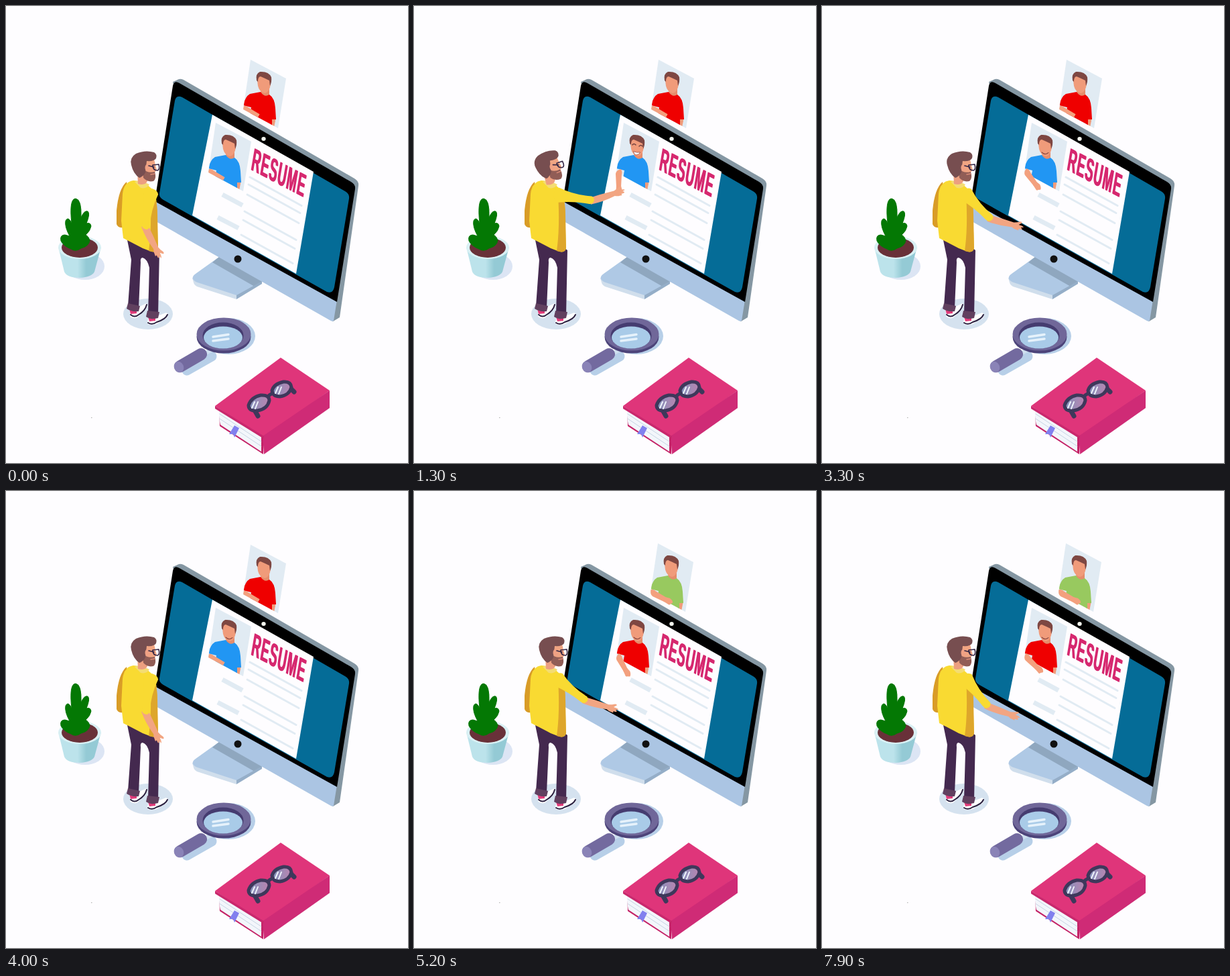
Write an HTML page that moves like this. It is 600x681 px and loops after 8000 ms.

```html
<!DOCTYPE html>
<html lang="en">
<head>
<meta charset="utf-8">
<title>Online interview</title>
<style>
html, body { margin: 0; width: 100%; height: 100%; overflow: hidden; background: #fefdff; }
svg { display: block; width: 100vw; height: 100vh; }
.line { fill: none; stroke-linecap: round; stroke-linejoin: round; }
.title { font: bold 48px "Liberation Sans", Arial, sans-serif; letter-spacing: 3px; fill: #d6286f; }
</style>
</head>
<body>
<svg viewBox="0 0 600 681" preserveAspectRatio="none">
<defs>
  <linearGradient id="lens"><stop offset="0" stop-color="#8193bd"/><stop offset="1" stop-color="#bb84b0"/></linearGradient>
  <linearGradient id="pot"><stop offset=".45" stop-color="#bce3eb"/><stop offset=".65" stop-color="#94cad5"/></linearGradient>
  <clipPath id="card"><path d="M313 174L366 202L354 276L302 248Z"/></clipPath>
</defs>

<g id="back"></g>

<g id="monitor">
  <path d="M279 408Q277 403 283 399L318 374L384 410L345 432L284 414Z" fill="#afc9e5"/>
  <path d="M318 374L384 410L371 418L308 382Z" fill="#8fa7bf"/>
  <path d="M279 406Q280 410 286 412L344 431V437L285 418Q279 415 279 406Z" fill="#d0deec"/>
  <path d="M344 431L382 410V414L344 437Z" fill="#95aec8"/>
  <path d="M249 113L258 109Q261 108 265 110L520 257Q527 261 526 268L498 464L488 470L300 340Z" fill="#8597a3"/>
  <path d="M223 287L494 438L489 469Q487 471 483 468L222 320Q217 316 218 311Z" fill="#abc5e3"/>
  <path d="M249 119Q251 110 259 115L515 262Q522 266 521 273L494 441L222 291Z" fill="#000"/>
  <path d="M252 141Q254 132 263 136L506 276Q513 280 512 287L490 419Q488 429 479 426L235 289Q228 285 229 279Z" fill="#056c97"/>
  <path d="M308 162L459 247L433 399L278 312Z" fill="#fefdff"/>
  <ellipse cx="384.500" cy="198" rx="3.200" ry="3" fill="#f3f6ed"/>
  <circle cx="346" cy="377" r="5.500" fill="#111"/>
  <path d="M313 174L366 202L354 276L302 248Z" fill="#e1ebf3"/>
  <g id="rules" class="line" stroke="#e1ebf3"></g>
  <g transform="matrix(.358 .187 -.165 .97 364.500 243.500)">
    <text id="word" class="title">RESUME</text>
    <use href="#word" x="3"/>
  </g>
</g>
<g id="seat"></g>
<g id="flyer"></g>

<g id="plant">
  <ellipse cx="118" cy="388" rx="29" ry="20" fill="#dce5f4"/>
  <path d="M78 359L87 396Q91 405 110 405Q128 404 132 396L142 359Z" fill="url(#pot)"/>
  <ellipse cx="110" cy="360" rx="32" ry="17" fill="#d9f0f4"/>
  <ellipse cx="110" cy="360" rx="27" ry="15" fill="#693139"/>
  <path d="M97 362Q86 358 82 350Q80 341 88 341L95 343Q87 328 89 320Q92 314 96 320L98 324Q94 287 104 287Q113 288 112 315Q117 304 122 306Q126 309 120 324Q126 322 127 328Q126 335 119 341Q123 343 125 349Q124 358 112 361Q104 367 97 362Z" fill="#047804" stroke="#047804"/>
</g>

<g id="man">
  <ellipse cx="212" cy="459" rx="37" ry="23" fill="#d5e2ef"/>
  <path d="M186 455L199 448L210 443Q213 448 207 454L195 465Q184 466 185 459Z" fill="#fff"/>
  <path d="M213 465L226 462L239 457Q244 459 240 465L225 474Q210 478 211 470Z" fill="#fff"/>
  <path class="line" d="M186 460Q192 465 198 460Q208 454 210 445M212 472Q218 476 225 471Q238 467 241 460" stroke="#2b2140" stroke-width="2"/>
  <path d="M184 451h11v7l-9 1ZM212 463h11v6l-9 1Z" fill="#e13a79"/>
  <path d="M180 344L187 378L182 447L198 450L201 382Q200 375 204 375Q211 377 214 390L212 459L227 462L229 364L206 345Z" fill="#44294f"/>
  <path d="M182 443L200 447L198 455Q187 456 180 451ZM211 454L229 456L227 465Q216 468 209 463Z" fill="#61405f"/>
  <path d="M180 262Q168 272 165 305V325Q167 331 174 330L184 290Z" fill="#d99c27"/>
  <path d="M190 260Q176 262 174 280L172 320L175 346Q183 350 204 361L217 366Q226 368 227 361L225 305Q226 280 216 271Q208 263 200 261Z" fill="#f9da32"/>
  <path d="M215 280Q226 283 226 310L227 361Q225 368 217 366L213 365Q218 330 215 280Z" fill="#dea62b"/>
  <path d="M192 262Q200 258 214 266Q210 273 201 271Z" fill="#f4dc72"/>
  <g id="head">
    <path d="M196 246H211V261Q208 268 197 265Z" fill="#ec9f80"/>
    <path d="M204 228H221L223 237L225 244L222 248V255Q221 260 215 260L204 253Z" fill="#f0a583"/>
    <path d="M204 242Q211 250 222 247Q225 257 220 261Q211 263 205 256Z" fill="#915d56"/>
    <path d="M216 251l6-1" class="line" stroke="#d98b77" stroke-width="1.500"/>
    <path d="M187 237Q184 226 194 220Q208 214 221 218Q226 221 224 227Q221 232 210 231L208 248Q205 254 199 256Q190 250 187 237Z" fill="#774e50"/>
    <ellipse cx="211.500" cy="241" rx="4" ry="5.500" fill="#f0a184"/>
    <path class="line" d="M213 238L221 240M219 237L228 236Q230 244 226 245Q219 245 219 237Z" stroke="#352746" stroke-width="1.600"/>
  </g>
  <g id="arm">
    <g id="fore">
      <path d="M-4 -5Q15 -5 35 -3.500L40 -5Q46 -9 47 -6L43 -2Q50 -2 51 0L47 1Q51 3 48 4L44 4Q46 7 42 6Q37 6 34 4Q15 7 -4 5Z" fill="#f2a582"/>
    </g>
    <path d="M-2 -10Q22 -3 48 -6Q54 -4 52 2Q51 6 45 6Q22 6 0 12Q-9 8 -9 0Q-8 -8 -2 -10Z" fill="#f9da32"/>
  </g>
</g>

<g id="magnifier">
  <ellipse cx="332" cy="492" rx="40" ry="27" fill="#b7cfe8"/>
  <path class="line" d="M270 543L307 522" stroke="#b7cfe8" stroke-width="15"/>
  <path class="line" d="M298 517L311 510" stroke="#cfdfef" stroke-width="6"/>
  <ellipse cx="325" cy="493" rx="40.500" ry="24.500" fill="#4c4379"/>
  <ellipse cx="325" cy="489" rx="40.500" ry="24.500" fill="#706799"/>
  <ellipse cx="324" cy="491" rx="30.500" ry="19.500" fill="#453c70"/>
  <ellipse cx="324" cy="494" rx="29" ry="16.500" fill="#a9cbe8"/>
  <path class="line" d="M309 493L332 489.500M309 499L332 496" stroke="#e6f2fb" stroke-width="3.500"/>
  <path class="line" d="M260 537L291 519" stroke="#736a9f" stroke-width="18"/>
  <ellipse cx="258" cy="538" rx="7" ry="8.500" transform="rotate(-25 258 538)" fill="#8a83b7"/>
</g>

<g id="book">
  <path d="M318 600L384 640V668L319 626Z" fill="#c42267"/>
  <path d="M318 599L381 642V664L320 624Q317 611 318 599Z" fill="#f3f6fb"/>
  <path class="line" d="M319 608L381 649M319 615L381 656" stroke="#c7d5e4" stroke-width="1"/>
  <path d="M410 524L483 573L385 643L312 596Z" fill="#df357a"/>
  <path d="M483 573V599L385 668L383 641Z" fill="#cf2b76"/>
  <path d="M312 596L385 641V645L312 600Z" fill="#c9286d"/>
  <path d="M341 625L348 629L341 643L339 638L333 638Z" fill="#8180ee"/>
  <g id="specs">
    <path class="line" d="M426 571L430 575M372 604L376 611" stroke="#3e385b" stroke-width="7"/>
    <path class="line" d="M389 586Q392 578 400 577" stroke="#3e385b" stroke-width="5"/>
    <g fill="url(#lens)" stroke="#3e385b" stroke-width="5">
      <path d="M397 573Q400 563 414 560Q425 559 426 568Q423 580 409 582Q398 582 397 573Z"/>
      <path d="M362 595Q366 583 380 580Q393 579 393 588Q390 601 375 603Q362 604 362 595Z"/>
    </g>
    <path class="line" d="M402 577L406 568M407 578L411 568M367 599L371 590M372 600L376 590" stroke="#eef3fb" stroke-width="2"/>
  </g>
</g>
<rect x="127" y="613" width="1.500" height="1" fill="#aaa"/>
</svg>

<script>
const $ = id => document.getElementById(id);
const LOOP = 8000, TICK = 100, SWAP = 4300, LAND = 4500;
const BLUE = '#2196f3', RED = '#ef0000', GREEN = '#98c95f';

const bar = (x, y, dx, dy, w) => `<path d="M${x} ${y}l${dx} ${dy}" stroke-width="${w}"/>`;
$('rules').innerHTML =
  [[364, 255], [362, 266], [360, 281], [356, 306], [354, 319], [351, 341]]
    .map(([x, y]) => bar(x, y, 77, 42.5, 3)).join('') +
  `<g stroke-linecap="butt">${bar(323, 281, 30, 16, 7)}${bar(316, 315, 31, 16, 7)}</g>`;

const faces = {
  calm: '',
  smile: '<path class="line" d="M328 218Q333 223 338 218.500" stroke="#8f4b43" stroke-width="1.100"/>',
  laugh: `<path d="M327.500 216.500Q332 219 338 218Q335 222.500 331 222Q328 220.500 327.500 216.500Z" fill="#fff" stroke="#9b5047" stroke-width=".8"/>
    <path class="line" d="M326 207Q328 204 331 207M336 209Q339 206 341 209" stroke="#70413f" stroke-width="1.500"/>`
};

// The forearm stays behind the card edge until the hand reaches out
function person(shirt, face, angle, dy, reaching) {
  const clip = reaching ? '' : 'clip-path="url(#card)"';
  const hand = '<path d="M20 -3.500L26 -5Q32 -4 33 -1L31 2Q31 5 27 4L20 3.500Z"/>';
  return `<g clip-path="url(#card)">
    <path d="M343 256L351 260L348 275L343 272Z" fill="#f09b7a"/>
    <path d="M329 212L341 216V228Q335 234 328 225Z" fill="#e58c6b"/>
    <path d="M328 222Q334 231 341 226Q349 231 350 246L351 263L345 263V273L312 257L314 245L302 242Q305 229 312 225Z" fill="${shirt}"/>
  </g>
  <path d="M322.500 201Q326 194 337 197Q344 200 343 211Q341 223 334 224Q326 222 324 213Z" fill="#f09b7a"/>
  <path d="M322 205Q320 195 327 192Q340 191 344 200Q345 207 342 213L341 205Q335 202 328 199Q324 199 324 207Z" fill="#7e4742"/>
  ${faces[face]}
  <g ${clip}><g transform="translate(305.500 ${248 + dy}) rotate(${angle})" fill="#f3a07e">
    <path d="M-5 -3Q-2 -6 3 -4.500L22 -3.500V3.500L2 4.500Q-3 4 -5 -3Z"/>
    ${reaching ? hand : ''}
  </g></g>`;
}

const card = shirt =>
  `<path d="M313 174L366 202L354 276L302 248Z" fill="#e1ebf3"/>` +
  person(shirt, 'calm', 28, 0, shirt === GREEN);

// Eased value between [time, value] steps
function track(t, steps) {
  let [t0, v0] = steps[0];
  for (const [t1, v1] of steps) {
    if (t < t1) {
      const u = t <= t0 ? 0 : (t - t0) / (t1 - t0);
      return v0 + (v1 - v0) * u * u * (3 - 2 * u);
    }
    [t0, v0] = [t1, v1];
  }
  return v0;
}

const UPPER = [[120, 0], [1050, 1], [2800, 1], [3950, 0], [4620, 0], [5550, 1], [7300, 1], [8550, 0]];
const FORE = [[200, 0], [1100, 1], [2800, 1], [3950, 0], [4700, 0], [5600, 1], [7300, 1], [8550, 0]];
const GUEST = [[200, 0], [1150, 1], [2750, 1], [3730, 0], [4700, 0], [5650, 1], [7250, 1], [8230, 0]];
const NOD = [[500, 0], [1200, -13], [1500, -13], [2400, -6], [3400, 0]];

function shake(t) {
  const u = (t >= 4500 ? t - 4500 : t) - 1400;
  return u > 0 && u < 900 ? Math.sin(u / 450 * 2 * Math.PI) : 0;
}

const move = (el, x, y) => el.setAttribute('transform', `translate(${x} ${y})`);
const cache = {};
function fill(id, html) {
  if (cache[id] !== html) $(id).innerHTML = cache[id] = html;
}

function draw(t) {
  const s = shake(t), guest = track(t, GUEST);
  const upper = 100 - 90 * track(t, UPPER) + 3 * s;
  const fore = 63 - 81 * track(t, FORE) + 4 * s;
  $('arm').setAttribute('transform', `translate(217 281) rotate(${upper})`);
  $('fore').setAttribute('transform', `translate(50 0) rotate(${fore - upper})`);
  $('head').setAttribute('transform', `rotate(${track(t, NOD)} 204 262)`);

  const swapped = t >= LAND;
  const face = t < 900 || (swapped && t < 4800) ? 'calm' : t >= 1100 && t < 2000 ? 'laugh' : 'smile';
  fill('seat', person(swapped ? RED : BLUE, face, 28 + 62 * guest, 4 * s, guest > .08));

  // The waiting card lifts off, crosses over the screen and the next one rises
  if (t < SWAP) {
    fill('back', card(RED));
    move($('back'), 52, track(t, [[4000, -94], [SWAP, -146]]));
  } else {
    fill('back', card(GREEN));
    move($('back'), 51, track(t, [[SWAP, -10], [4600, -96]]));
  }
  const flying = t >= SWAP && !swapped;
  fill('flyer', flying ? card(RED) : '');
  const k = track(t, [[SWAP, 1], [LAND, 0]]);
  move($('flyer'), 52 * k, -146 * k);
}

function frame(now) {
  draw(Math.floor(now % LOOP / TICK) * TICK);
  requestAnimationFrame(frame);
}
draw(0);
requestAnimationFrame(frame);
</script>
</body>
</html>
```
